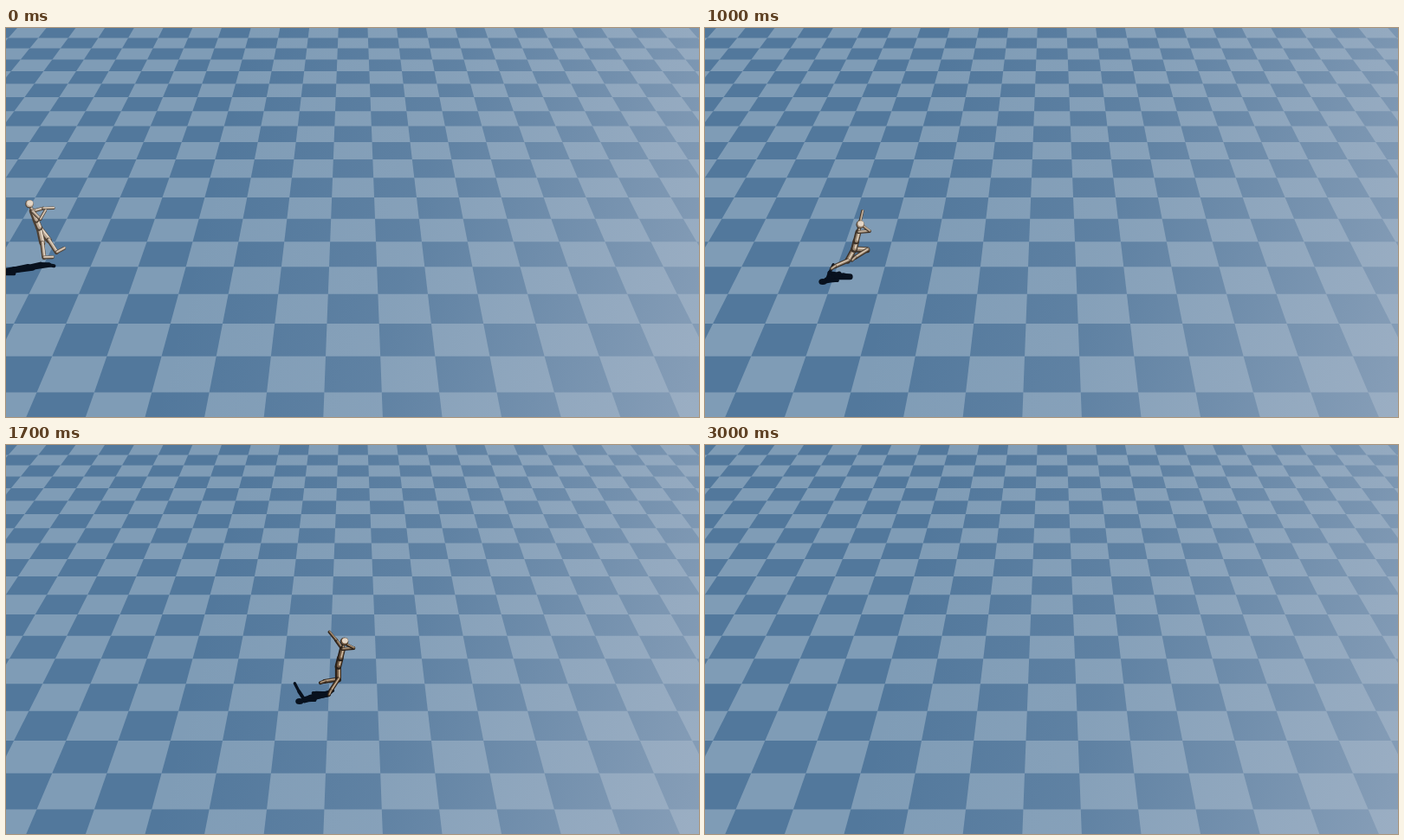
Recreate the animation shown at these times as an HTML page with a canvas. Size 800 by 450 pixels, loop 3400 ms.

```html
<!DOCTYPE html>
<html lang="en">
<head>
<meta charset="utf-8">
<title>Runner</title>
<style>
  html, body { margin: 0; width: 100%; height: 100%; overflow: hidden; background: #7f9cb6; }
  canvas { display: block; width: 800px; height: 450px; }
</style>
</head>
<body>
<canvas id="stage" width="800" height="450"></canvas>
<script>
const ctx = document.getElementById('stage').getContext('2d');
const LOOP = 3400, STEP = 100, LAST = 30;
const SHADOW = '#08111e';
const RAD = Math.PI / 180;

const { sin, cos, min, exp } = Math;
const mix = (a, b, u) => a + (b - a) * u;
const ease = u => u * u * (3 - 2 * u);

// Angles are in degrees: 0 points down, 90 ahead, 180 up.
function pose(n) {
  const run = ease(min(1, n / 7)), u = n / 25;
  const x = 38 + 642 * u ** (1.46 + .1 / u);
  const ground = 286 - 15 * exp(-n / 8);
  const hip = { x, y: mix(231, 256, run), far: 0 };
  const bones = [];

  function bone(from, angle, length, width, far = 0) {
    const to = {
      x: from.x + length * sin(angle * RAD),
      y: from.y + length * cos(angle * RAD),
      far
    };
    bones.push({ from, to, width });
    return to;
  }

  function leg(phase, still) {
    const p = phase * RAD;
    const stride = 14.5 + 58 * cos(p) + 14.5 * cos(2 * p);
    const bend = 74 + 54 * cos(p) - 24 * sin(p) + 17 * cos(2 * p);
    const thigh = mix(still, stride, run), shin = thigh - mix(5, bend, run);
    const knee = bone(hip, thigh, mix(18, 15, run), 7);
    const ankle = bone(knee, shin, mix(17, 16, run), 5);
    bone(ankle, shin + mix(85, 10, run), mix(10, 5, run), 4);
  }

  function arm(shoulder, upper, fore, far) {
    const elbow = bone(shoulder, upper, 13, 4, far / 2);
    bone(elbow, fore, 12, 3.4, far);
  }

  const lean = mix(202, 166, run);
  const neck = { x: x + 20.5 * sin(lean * RAD), y: hip.y + 20.5 * cos(lean * RAD), far: 0 };
  arm(neck, 105 + 6.5 * n, 92 + 7.5 * n, run);
  leg(90 * n + 180, 38);
  leg(90 * n, 12);
  const waist = bone(hip, lean, 9.5, 7.6);
  bone(waist, lean, 11, 7);
  const head = bone(neck, lean, 9, 3.5);
  arm(neck, mix(45, 95, run), 150 + 95 * sin(Math.PI * u / 1.2), 0);
  return { x, ground, bones, head };
}

function line(a, b, width, color, shift = 0) {
  ctx.strokeStyle = color;
  ctx.lineWidth = width;
  ctx.beginPath();
  ctx.moveTo(a.x + shift, a.y - shift);
  ctx.lineTo(b.x + shift, b.y - shift);
  ctx.stroke();
}

function disc(x, y, rx, ry, color) {
  ctx.fillStyle = color;
  ctx.beginPath();
  ctx.ellipse(x, y, rx, ry, 0, 0, 7);
  ctx.fill();
}

function drawShadow({ x, ground, bones, head }) {
  const reach = .7 + .00055 * x;
  const cast = p => {
    const h = ground - p.y;
    return { x: p.x - reach * h + 22 * p.far, y: ground + 1 + .2 * h - 23 * p.far };
  };
  for (const { from, to, width } of bones) line(cast(from), cast(to), width, SHADOW);
  const top = cast(head);
  disc(top.x, top.y, 4.6, 3.5, SHADOW);
}

// The light comes from the right, so the near side darkens along the way.
function drawFigure({ x, bones, head }) {
  const u = min(1, x / 420);
  const tint = (a, b) => `rgb(${a.map((v, i) => Math.round(mix(v, b[i], u)))})`;
  const dark = tint([80, 66, 54], [36, 28, 21]);
  const base = tint([192, 174, 155], [104, 80, 56]);
  const light = tint([232, 221, 208], [208, 186, 158]);
  for (const { from, to, width } of bones) {
    line(from, to, width, dark);
    line(from, to, width * .62, base, width * .1);
    line(from, to, width * .22, light, width * .2);
  }
  disc(head.x, head.y, 4.7, 4.7, dark);
  disc(head.x + .4, head.y - .5, 4.1, 4.1, base);
  disc(head.x + .8, head.y - 1.1, 3.4, 3.1, '#e4d6c6');
}

function drawFloor() {
  const depth = k => 1 / (k + 19.6);
  const px = (c, k) => 400.6 + 1301 * c * depth(k);
  const py = k => -435 + 16785 * depth(k);
  ctx.fillStyle = '#7f9cb6';
  ctx.fillRect(0, 0, 800, 450);
  ctx.fillStyle = '#52789c';
  for (let k = -1; k < 20; k++) {
    for (let c = -13; c <= 13; c++) {
      if ((k + c) % 2) continue;
      ctx.beginPath();
      ctx.moveTo(px(c - .5, k), py(k));
      ctx.lineTo(px(c + .5, k), py(k));
      ctx.lineTo(px(c + .5, k + 1), py(k + 1));
      ctx.lineTo(px(c - .5, k + 1), py(k + 1));
      ctx.fill();
    }
  }
  const haze = ctx.createLinearGradient(250, 130, 830, 275);
  haze.addColorStop(0, 'rgba(176,188,205,0)');
  haze.addColorStop(.4, 'rgba(176,188,205,.14)');
  haze.addColorStop(1, 'rgba(176,188,205,.55)');
  ctx.fillStyle = haze;
  ctx.fillRect(0, 0, 800, 450);
}

let shown = -1;
function tick(now) {
  const n = min(LAST, Math.floor(now % LOOP / STEP));
  if (n !== shown) {
    shown = n;
    drawFloor();
    if (n < LAST) {
      const runner = pose(n);
      drawShadow(runner);
      drawFigure(runner);
    }
  }
  requestAnimationFrame(tick);
}

ctx.lineCap = ctx.lineJoin = 'round';
tick(0);
</script>
</body>
</html>
```
